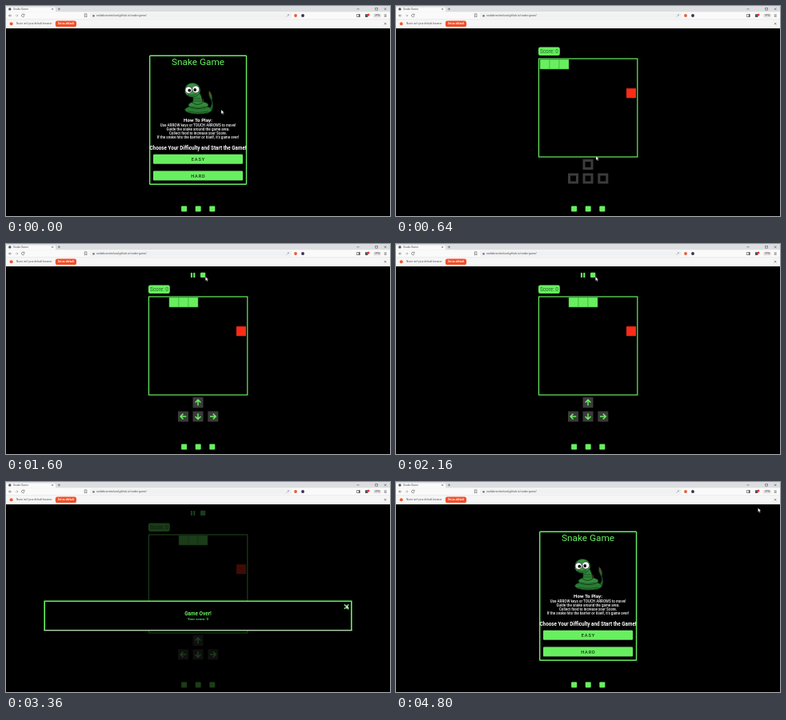
An HTML page for the animation above (4.88 s loop, 480 by 263 pixels).

```html
<!DOCTYPE html>
<html lang="en">
<head>
<meta charset="utf-8">
<title>Snake Game</title>
<style>
  html, body { margin: 0; width: 100%; height: 100%; overflow: hidden; background: #000; }
  svg { display: block; width: 100%; height: 100%; }
  text { font-family: Roboto, "Liberation Sans", sans-serif; }
  .mid { text-anchor: middle; }
  .bold { font-weight: 700; }
  .green { fill: #68ef60; }
  .line { fill: none; stroke: #68ef60; }
  .thin { fill: none; stroke: #555; stroke-width: .6; }
  .tiny { font-size: 3.4px; fill: #555; }
</style>
</head>
<body>
<svg viewBox="0 0 480 263">
  <rect width="480" height="263"/>

  <g id="social" class="green"></g>

  <g id="menu">
    <rect class="line" x="179.7" y="62.2" width="120.8" height="161" rx=".8" stroke-width="1.4"/>
    <text class="mid green" x="240" y="73.8" font-size="11.8">Snake Game</text>
    <g stroke="#0a2a10" stroke-width=".7">
      <path d="M247 131Q260 128 256.5 118Q252 111 254 106Q259 112 257.5 118Q262 131 251 135Z" fill="#23682c"/>
      <ellipse cx="240.5" cy="130" rx="17" ry="5.2" fill="#2b7a34"/>
      <ellipse cx="240.5" cy="124" rx="12.5" ry="4.6" fill="#328a3b"/>
      <path d="M230 110Q236 114 233 121Q239 126 246 121Q245 113 241 106Z" fill="#2f8638"/>
      <path d="M223.5 108Q223 97 233 96.3Q243 97 243 107Q240 114 232 114Q225 113 223.5 108Z" fill="#359441"/>
    </g>
    <path d="M234 116h9M234 119h10M231 126q9 3 19 0M228 132q12 3 25 0" fill="none" stroke="#16491d" stroke-width=".8"/>
    <path d="M227 111.3q5 2 11-.8" fill="none" stroke="#0a2a10" stroke-width=".7"/>
    <path d="M255 108l1 5M246 116l1 5" stroke="#a33a22" stroke-width=".7"/>
    <g fill="#fff" stroke="#111" stroke-width=".6">
      <circle cx="228.3" cy="105.2" r="4.3"/><circle cx="237.2" cy="104.4" r="4.5"/>
    </g>
    <circle cx="229.3" cy="105.7" r="1.9"/><circle cx="236.2" cy="105" r="1.9"/>
    <g class="mid bold" fill="#fff">
      <text x="240" y="145.2" font-size="6.2">How To Play:</text>
      <g id="rules" font-size="4.5" fill="#d6d6d6"></g>
      <text x="240" y="180.2" font-size="6.3">Choose Your Difficulty and Start the Game!</text>
    </g>
    <g id="levels"></g>
  </g>

  <g id="game">
    <rect class="green" x="178" y="51.6" width="26.8" height="10.4" rx="2.2"/>
    <text class="mid" x="191.4" y="59.2" font-size="6.4" fill="#236b25">Score: 0</text>
    <rect class="line" x="178.5" y="66" width="123.3" height="123" stroke-width="1.2"/>
    <rect x="288" y="103.2" width="12" height="12" fill="#fb2c17"/>
    <g id="snake"></g>
    <g id="keys"></g>
    <g id="controls" class="green">
      <rect x="230.9" y="36" width="2.1" height="6" rx=".5"/>
      <rect x="234.2" y="36" width="2.1" height="6" rx=".5"/>
      <rect x="243" y="35.8" width="6.3" height="6.3" rx="1"/>
    </g>
  </g>

  <g id="over">
    <rect y="28" width="480" height="235" opacity=".75"/>
    <rect x="48" y="149" width="384" height="37"/>
    <path class="line" d="M48.2 186V149.2H431.8V186" stroke-width="1.6"/>
    <path d="M47.4 185.8H432.6" stroke="#a9c8a4" stroke-width="1.5"/>
    <text class="mid bold green" x="240" y="167.2" font-size="6.4">Game Over!</text>
    <text class="mid bold" x="240" y="172.8" font-size="4.4" fill="#57cf50">Your score: 0</text>
    <path class="line" d="M423.3 153.9l4.6 4.6m0-4.6l-4.6 4.6" stroke-width="1.5" stroke-linecap="round"/>
  </g>

  <g id="browser">
    <rect width="480" height="28" fill="#f6f6f6"/>
    <rect width="480" height="7.5" fill="#dcdee1"/>
    <path d="M0 7.5V1.5H60q2 0 2 2V7.5Z" fill="#fafafa"/>
    <rect y="7.5" width="480" height="9" fill="#fafafa"/>
    <rect x="105" y="8.6" width="252" height="6.8" rx="1" fill="#f0f1f2"/>
    <path d="M0 16.7H480" stroke="#dedede" stroke-width=".5"/>
    <circle cx="4.8" cy="3.9" r="1.7" fill="#555"/>
    <text class="tiny" x="9" y="5.1">Snake Game</text>
    <path class="thin" d="M57 2.8l2 2m0-2l-2 2M64.8 3.8h3m-1.5-1.5v3"/>
    <path class="thin" d="M7 12H3.6m1.6-1.6L3.6 12l1.6 1.6"/>
    <path class="thin" d="M11.6 12H15m-1.6-1.6L15 12l-1.6 1.6" opacity=".5"/>
    <path class="thin" d="M22.8 11a1.8 1.8 0 1 0 .2 1.4M23 9.8v1.4h-1.4"/>
    <path class="thin" d="M98.3 9.8h2.6v4.2l-1.3-1.1-1.3 1.1Z"/>
    <rect x="108.4" y="11.4" width="2.2" height="1.9" fill="#555"/>
    <text class="tiny" x="113" y="13.2">nadiakvorstenlund.github.io/snake-game/</text>
    <path class="thin" d="M350.6 13.6l2.8-2.8m-1.4 0h1.4v1.4" opacity=".6"/>
    <circle cx="362" cy="12" r="1.9" fill="#f4552f"/>
    <circle cx="371" cy="12" r="1.9" fill="#3b2d52"/>
    <rect class="thin" x="438.7" y="10.3" width="3.5" height="3.4"/>
    <path d="M440.8 10.3h1.4v3.4h-1.4Z" fill="#555"/>
    <rect x="449" y="10.2" width="3.4" height="3.8" fill="#555"/>
    <circle cx="453" cy="11" r="1.5" fill="#e33b2e"/>
    <rect x="459.2" y="9.8" width="9.6" height="4.6" rx="1" fill="#e8e3e3"/>
    <text class="tiny mid" x="464" y="13.2" font-size="3">VPN</text>
    <path class="thin" d="M472.7 10.9h3m-3 1.2h3m-3 1.2h3"/>
    <path class="thin" d="M438.5 3.8h3M472.8 2.4l2.7 2.7m0-2.7l-2.7 2.7"/>
    <rect class="thin" x="461.8" y="2.5" width="2.6" height="2.6"/>
    <circle cx="6.6" cy="22.2" r="2" fill="#f4552f"/>
    <text class="tiny" x="13" y="23.4" style="font-size:3.2px">Nuvio isn't your default browser</text>
    <rect x="61.8" y="18.4" width="26.2" height="7.7" rx="2.6" fill="#f4502a"/>
    <text class="mid bold" x="74.9" y="23.4" font-size="3.3" fill="#fff">Set as default</text>
    <path class="thin" d="M472.8 20.9l2.6 2.6m0-2.6l-2.6 2.6" stroke-width=".8"/>
  </g>

  <path id="cursor" d="M0 0V4.9L1.2 3.9L2 5.8L2.9 5.4L2.1 3.6H3.6Z" fill="#fff" stroke="#333" stroke-width=".3"/>
</svg>

<script>
const LOOP = 4880, STEP = 80, CELL = 12;
const $ = id => document.getElementById(id);

function add(parent, tag, attrs, text) {
  const el = document.createElementNS('http://www.w3.org/2000/svg', tag);
  for (const k in attrs) el.setAttribute(k, attrs[k]);
  if (text) el.textContent = text;
  return $(parent).appendChild(el);
}

for (const x of [222.6, 240.2, 257.8])
  add('social', 'rect', { x: x - 3.5, y: 250.5, width: 7, height: 7, rx: 1 });

[
  'Use ARROW keys or TOUCH ARROWS to move!',
  'Guide the snake around the game area.',
  'Collect food to increase your Score.',
  "If the snake hits the barrier or itself, it's game over!"
].forEach((line, i) => add('rules', 'text', { x: 240, y: 150.8 + i * 4.95 }, line));

['EASY', 'HARD'].forEach((name, i) => {
  const y = 185.8 + i * 20.8;
  add('levels', 'rect', { class: 'green', x: 184, y, width: 112, height: 12, rx: 1.2 });
  add('levels', 'text', {
    class: 'mid', x: 240.4, y: y + 8, 'font-size': 5.7, 'font-weight': 500,
    'letter-spacing': .8, fill: '#12300f'
  }, name);
});

for (let i = 0; i < 3; i++)
  add('snake', 'rect', {
    class: 'green', x: 180 + i * CELL, y: 67, width: CELL, height: CELL,
    stroke: '#3fa03a', 'stroke-width': .5
  });

// Touch keys: hollow until their arrows have loaded.
const holes = [], arrows = [];
for (const [x, y, turn] of [[240, 198.5, 0], [221.5, 216, -90], [240, 216, 180], [258.8, 216, 90]]) {
  add('keys', 'rect', { x: x - 6.5, y: y - 6.5, width: 13, height: 13, fill: '#3b3b3b' });
  holes.push(add('keys', 'rect', { x: x - 3.5, y: y - 3.5, width: 7, height: 7 }));
  arrows.push(add('keys', 'path', {
    class: 'line', d: 'M0 3.8V-3.3M-3.4 0L0 -3.4L3.4 0', 'stroke-width': 1.5,
    transform: `translate(${x} ${y}) rotate(${turn})`
  }));
}

// Pointer stops: time, x, y
const path = [
  [0, 269, 130], [80, 268, 134], [400, 250, 188], [720, 250, 188], [1040, 256, 161],
  [1520, 249.5, 42], [1600, 249.3, 41], [2400, 249.3, 41], [2720, 366, 165],
  [2960, 408, 161], [3360, 425.3, 154], [3840, 426, 154.6], [4000, 426, 154.6],
  [4480, 455, 47], [4800, 452.5, 32.5], [LOOP, 452.5, 32.5]
];

function pointer(t) {
  const i = path.findIndex(p => p[0] > t);
  const [t0, x0, y0] = path[i - 1], [t1, x1, y1] = path[i];
  const u = (t - t0) / (t1 - t0), e = u * u * (3 - 2 * u);
  return [x0 + (x1 - x0) * e, y0 + (y1 - y0) * e];
}

const show = (el, on) => el.style.display = on ? '' : 'none';

function draw(now) {
  const t = Math.floor(now % LOOP / STEP) * STEP;
  const playing = t >= 560 && t < 3520, loaded = t >= 800;
  show($('menu'), !playing);
  show($('game'), playing);
  show($('over'), playing && t >= 2480);
  show($('controls'), loaded);
  holes.forEach(el => show(el, !loaded));
  arrows.forEach(el => show(el, loaded));

  const moves = [1120, 1600, 2160].filter(m => t >= m).length;
  $('snake').setAttribute('transform', `translate(${moves * CELL} 0)`);
  $('cursor').setAttribute('transform', `translate(${pointer(t)})`);
}

const start = performance.now();
function tick() {
  draw(performance.now() - start);
  requestAnimationFrame(tick);
}
tick();
</script>
</body>
</html>
```
